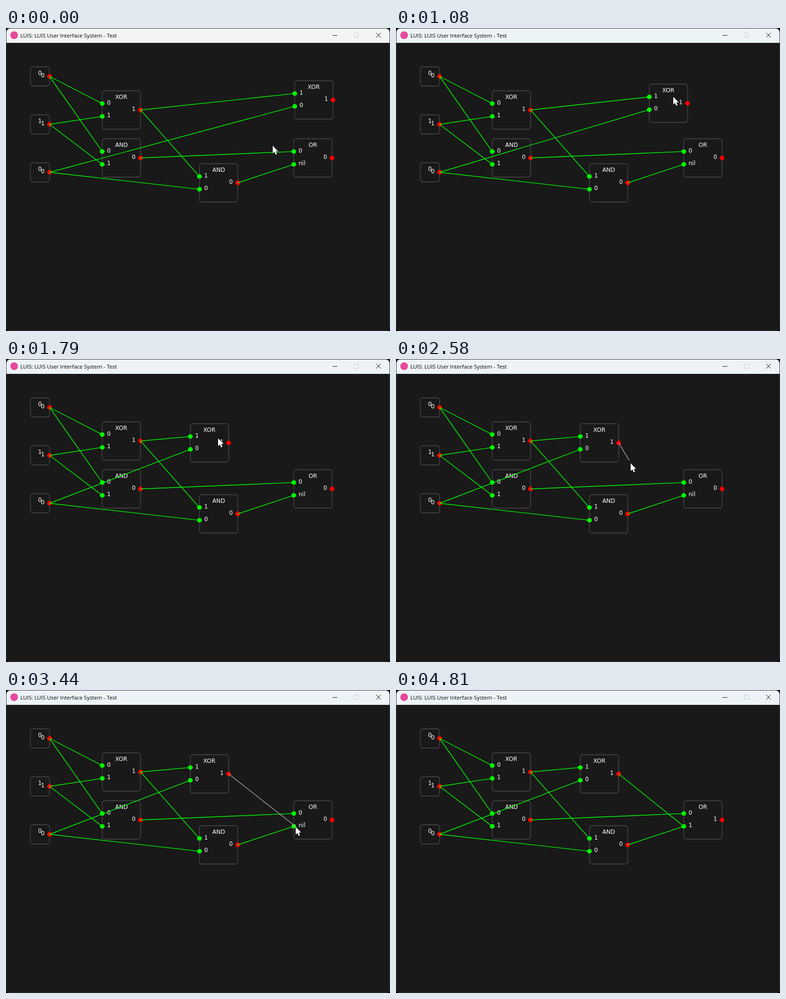
Write an HTML page that moves like this. It is 802x632 px and loops after 5.3 s.

```html
<!DOCTYPE html>
<html lang="en">
<head>
<meta charset="utf-8">
<title>LUIS node editor</title>
<style>
  html, body { margin: 0; width: 100%; height: 100%; overflow: hidden; background: #000; }
  svg { display: block; width: 802px; height: 632px; }
  .label { font: 12px "DejaVu Sans", sans-serif; fill: #fff; }
  .box { fill: none; stroke: #4a4a4a; stroke-width: 1.3; }
  .in, .out { shape-rendering: crispEdges; }
  .in { fill: #0f0; }
  .out { fill: #f00; }
  .wire { stroke: #0f0; stroke-width: 1.4; }
  .pending { stroke: #b0b0b0; stroke-width: 1.3; }
  .title { font: 11.3px "Open Sans", "Noto Sans", sans-serif; fill: #000; }
</style>
</head>
<body>
<svg id="stage" viewBox="0 0 802 632">
  <rect x=".5" y=".5" width="801" height="631" rx="8" fill="#191919" stroke="#333"/>
  <path id="bar" d="M1 31V9a8 8 0 0 1 8-8H793a8 8 0 0 1 8 8V31Z"/>
  <circle cx="17" cy="15" r="8" fill="#e64a9b"/>
  <text class="title" x="30" y="20">LUIS: LUIS User Interface System - Test</text>
  <g fill="none" stroke="#111">
    <path d="M682 15.5H692"/>
    <rect x="727.5" y="10.5" width="9" height="9" rx="1" stroke="#c6cacc"/>
    <path d="M773 10L783 20M783 10L773 20"/>
  </g>
  <g id="nodes"></g>
  <g id="wires"></g>
  <path id="cursor" d="M0 .5V16.7L3.7 13.3L6.3 19.2L9 18L6.5 12.3H11.5Z"
        fill="#fff" stroke="#000" paint-order="stroke"/>
</svg>
<script>
const LOOP = 5300, STEP = 77;
const GRAB = 930, DROP = 1540, PULL = 2440, CONNECT = 4020, LEAVE = 4810;
const $ = id => document.getElementById(id);

function make(parent, tag, attrs, text) {
  const el = document.createElementNS("http://www.w3.org/2000/svg", tag);
  set(el, attrs);
  if (text !== undefined) el.textContent = text;
  return parent.appendChild(el);
}

function set(el, attrs) {
  for (const k in attrs) el.setAttribute(k, attrs[k]);
}

// Ports are ten-sided discs
function disc(cx, cy, r = 5, n = 10) {
  return Array.from({ length: n }, (_, i) => {
    const a = i * 2 * Math.PI / n;
    return `${cx + r * Math.cos(a)},${cy + r * Math.sin(a)}`;
  }).join(" ");
}

function addNode(x, y, size, name, inputs, output) {
  const g = make($("nodes"), "g", { transform: `translate(${x} ${y})` });
  const label = (lx, ly, s) => make(g, "text", { x: lx, y: ly, class: "label" }, s);
  const dot = (cx, cy, cls) => make(g, "polygon", { points: disc(cx, cy), class: cls });
  make(g, "rect", { width: size, height: size, rx: 5, class: "box" });
  const head = label(0, 17, name);
  set(head, { x: Math.round((size - head.getComputedTextLength()) / 2) });
  const ins = inputs.map((value, i) => {
    const py = size * (i + 1) / 3;
    dot(0, py, "in");
    return label(10, Math.round(py + 2), value);
  });
  const out = label(size - 18, size / 2 + 2, output);
  dot(size, size / 2, "out");
  return { g, x, y, size, ins, out };
}

const a = addNode(51, 81, 40, "0", [], "0");
const b = addNode(51, 181, 40, "1", [], "1");
const carry = addNode(51, 281, 40, "0", [], "0");
const xor1 = addNode(201, 131, 80, "XOR", ["0", "1"], "1");
const and1 = addNode(201, 231, 80, "AND", ["0", "1"], "0");
const and2 = addNode(404, 283, 80, "AND", ["1", "0"], "0");
const or = addNode(601, 231, 80, "OR", ["0", "nil"], "0");
const xor2 = addNode(603, 110, 80, "XOR", ["1", "0"], "1");

const wire = (from, to, port) => ({ from, to, port, el: make($("wires"), "line", { class: "wire" }) });
const wires = [
  wire(a, xor1, 0), wire(b, xor1, 1), wire(a, and1, 0), wire(b, and1, 1),
  wire(xor1, and2, 0), wire(carry, and2, 1), wire(and1, or, 0), wire(and2, or, 1),
  wire(xor1, xor2, 0), wire(carry, xor2, 1)
];
const link = wire(xor2, or, 1);

const linear = p => p;
const speedUp = p => p ** 1.5;
const slowDown = p => 1 - (1 - p) ** 1.5;

// Pointer path: each move runs from the end of the one before
const moves = [];
let home = { x: 557, y: 245 };
function move(start, end, x, y, ease = linear, sway = 0) {
  const from = moves.length ? moves[moves.length - 1].to : home;
  moves.push({ start, end, from, to: { x, y }, ease, sway, gaps: Math.round((end - start) / STEP) });
}
move(0, 0, home.x, home.y);
move(80, 240, 572, 228, slowDown);
move(480, 850, 661, 134, slowDown);
move(GRAB, 1010, 616, 138);
move(1080, 1310, 469, 156);
move(1390, DROP, 435, 161, slowDown);
move(1790, 2120, 463, 175, slowDown);
move(2270, 2270, 467, 175);
move(PULL, 2580, 490, 217, speedUp);
move(2670, 2970, 606, 293, slowDown);
move(3060, 3060, 611, 286);
move(3140, 3530, 604, 285, slowDown);
move(3780, 3780, 602, 286);
move(4420, LEAVE, 575, 660, speedUp, 32);

function along(m, step) {
  const e = m.ease((step + 1) / (m.gaps + 1));
  const mix = k => m.from[k] + (m.to[k] - m.from[k]) * e;
  return { x: Math.round(mix("x") + m.sway * Math.sin(2 * Math.PI * e)), y: Math.round(mix("y")) };
}

// Current pointer and the one a step earlier
function pointer(t) {
  const m = moves.findLast(v => v.start <= t);
  const step = m.gaps ? Math.min(m.gaps, Math.floor((t - m.start) * m.gaps / (m.end - m.start) + .02)) : 0;
  return [along(m, step), along(m, step - 1)];
}

function place({ from, to, port, el }) {
  set(el, {
    x1: from.x + from.size, y1: from.y + from.size / 2,
    x2: to.x, y2: to.y + to.size * (port + 1) / 3
  });
}

function draw(t) {
  const [now, prev] = pointer(t);
  set($("bar"), { fill: t < 80 ? "#f3f4f4" : "#edf4f8" });

  const hand = pointer(Math.min(t, DROP))[0];
  xor2.x = t < GRAB ? 603 : hand.x - 50;
  xor2.y = t < GRAB ? 110 : hand.y - 26;
  set(xor2.g, { transform: `translate(${xor2.x} ${xor2.y})` });
  wires.forEach(place);

  const joined = t >= CONNECT;
  place(link);
  set(link.el, { class: joined ? "wire" : "pending", visibility: t < PULL ? "hidden" : "visible" });
  if (!joined) {
    // The loose end trails the pointer a little
    const trail = k => prev[k] + (now[k] - prev[k]) * .7;
    set(link.el, { x2: trail("x"), y2: trail("y") });
  }
  or.ins[1].textContent = joined ? "1" : "nil";
  or.out.textContent = joined ? "1" : "0";

  set($("cursor"), {
    transform: `translate(${now.x} ${now.y})`,
    visibility: t < LEAVE ? "visible" : "hidden"
  });
}

const began = performance.now();
function tick() {
  draw((performance.now() - began) % LOOP);
  requestAnimationFrame(tick);
}
tick();
</script>
</body>
</html>
```
